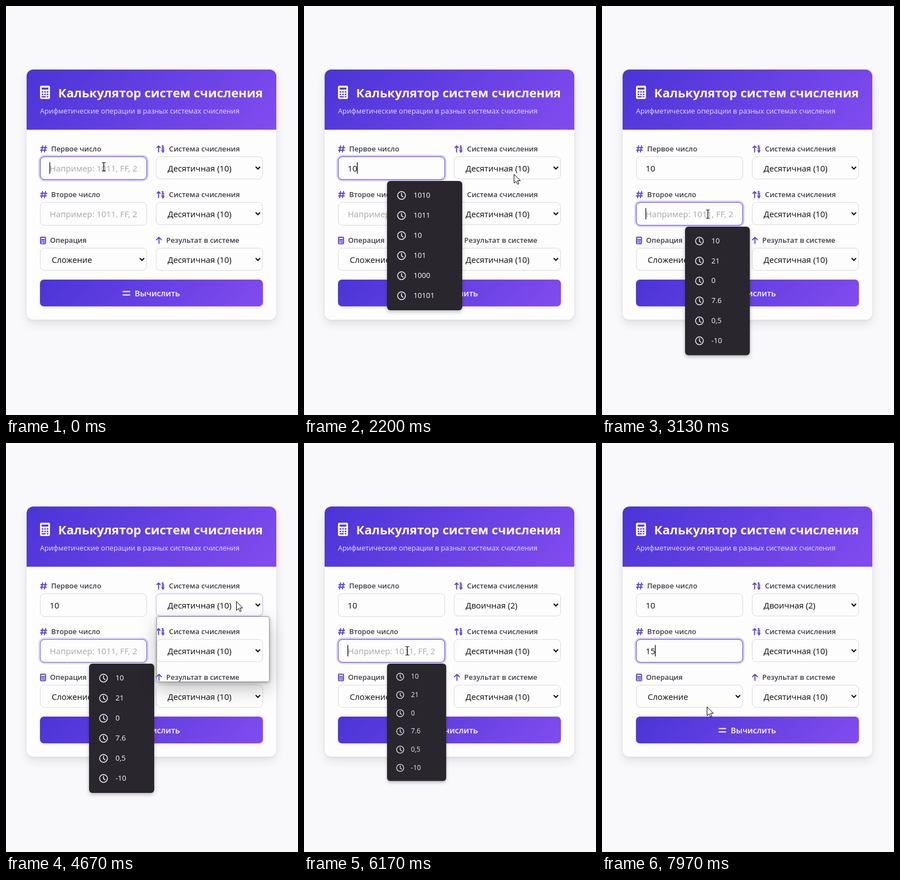
An HTML page for the animation above (8 s loop, 524 by 734 pixels).

```html
<!DOCTYPE html>
<html lang="ru">
<head>
<meta charset="utf-8">
<title>Калькулятор систем счисления</title>
<style>
  html, body { margin: 0; width: 100%; height: 100%; overflow: hidden; background: #f9f9fb; }
  body { position: relative; font-family: "Open Sans", "Noto Sans", sans-serif; }
  svg { position: absolute; left: 0; top: 0; width: 524px; height: 734px; }
  .card { position: absolute; left: 37px; top: 114px; width: 448px; height: 449px; border-radius: 12px;
    background: #fdfdfd; box-shadow: 0 8px 18px rgba(0, 0, 0, .09), 0 2px 5px rgba(0, 0, 0, .06); }
  .header, .button { background: linear-gradient(135deg, #4a34d7, #824cef); }
  .header { height: 108px; border-radius: 12px 12px 0 0; }
  .button { position: absolute; left: 24px; top: 377px; width: 400px; height: 48px; border-radius: 7px;
    box-shadow: 0 2px 4px rgba(0, 0, 0, .12); }
  .title { font-size: 22.15px; font-weight: 700; fill: #fff; }
  .subtitle { font-size: 12.7px; fill: #e4dffb; }
  .label { font-size: 12.85px; font-weight: 600; fill: #3a3d46; }
  .value { font-size: 14.85px; fill: #0a0a0c; }
  .hint { font-size: 15.05px; fill: #a6a6aa; }
  .submit { font-size: 14.3px; font-weight: 600; fill: #fff; }
  .item { font-size: 13.2px; fill: #fff; }
  .icon { color: #5844d8; fill: none; stroke: currentColor; stroke-width: 1.9; stroke-linecap: round; stroke-linejoin: round; }
  .solid { fill: currentColor; stroke: none; }
  .field { fill: #fdfdfd; stroke: #d9dae0; }
  .list { position: absolute; left: 270px; top: 311px; width: 201px; height: 116px; overflow: hidden;
    border: 1px solid #9a9a9e; border-radius: 4px; font-size: 14.85px; line-height: 29px; color: #0a0a0c;
    box-shadow: 0 12px 32px rgba(0, 0, 0, .24), 0 1px 5px rgba(0, 0, 0, .3); }
  .list div { padding-left: 19px; height: 29px; white-space: nowrap; }
  .list.ready { background: #fff; }
  .list:not(.ready) div { visibility: hidden; }
  .list .active { background: #1967d2; color: #fff; }
</style>
</head>
<body>
<div class="card"><div class="header"></div><div class="button"></div></div>

<svg viewBox="0 0 524 734">
  <defs>
    <path id="calc" fill-rule="evenodd" d="M3 0H15a3 3 0 0 1 3 3V21a3 3 0 0 1-3 3H3a3 3 0 0 1-3-3V3a3 3 0 0 1 3-3Z
      M3 3.4V7H15V3.4Z M3 10V12.6H5.8V10Z M7.6 10V12.6H10.4V10Z M12.2 10V12.6H15V10Z
      M3 14.4V17H5.8V14.4Z M7.6 14.4V17H10.4V14.4Z M12.2 14.4V17H15V14.4Z M3 18.8V21H10.4V18.8Z M12.2 18.8V21H15V18.8Z"/>
    <path id="hash" d="M4.7 1 2.7 12M10 1 8 12M1.6 4.2H12M.9 8.8H11.3"/>
    <path id="sort" d="M3.8 12V1.2M1 4 3.8 1.2 6.6 4M10 1.6 11.6.9V5M10 5.2H13.2M13.2 9.2a1.6 1.6 0 1 1-3.2 0a1.6 1.6 0 1 1 3.2 0Q13.2 11.4 11.2 12.4"/>
    <path id="up" d="M5.5 12V1.2M1 5.6 5.5 1.2 10 5.6"/>
    <path id="chevron" d="M-4 -2 0 2 4 -2" fill="none" stroke="#0a0a0c" stroke-width="2"/>
    <g id="clock" fill="none" stroke="#f0f0f2" stroke-width="1.5" stroke-linecap="round">
      <circle r="7"/><path d="M0 -4V.4L2.8 2.6"/>
    </g>
    <filter id="soft" x="-20%" y="-20%" width="140%" height="140%">
      <feDropShadow dx="0" dy="3" stdDeviation="3" flood-color="#000" flood-opacity=".25"/>
    </filter>
  </defs>

  <use href="#calc" x="61" y="143" fill="#fff"/>
  <text class="title" x="93.5" y="164">Калькулятор систем счисления</text>
  <text class="subtitle" x="61" y="193">Арифметические операции в разных системах счисления</text>
  <g id="form"></g>
  <path d="M210 512.5H222M210 518.5H222" stroke="#fff" stroke-width="2" stroke-linecap="round"/>
  <text class="submit" x="231" y="521">Вычислить</text>
  <path id="caret" stroke="#000" stroke-width="1.2"/>
  <g id="history"></g>
</svg>

<div class="list" id="list"></div>

<svg viewBox="0 0 524 734">
  <path id="beam" d="M-3.5 -7.5H-1Q0 -7.5 0 -6.5Q0 -7.5 1 -7.5H3.5M0 -7V7M-3.5 7.5H-1Q0 7.5 0 6.5Q0 7.5 1 7.5H3.5" fill="none" stroke="#000" stroke-width="1.2"/>
  <path id="arrow" d="M.5 .5V16.5L4.2 13 6.8 18.6 9.2 17.5 6.7 12.1H11.8Z" fill="#fff" stroke="#000"/>
</svg>

<script>
const LOOP = 8000;
const $ = id => document.getElementById(id);
const clamp = v => Math.max(0, Math.min(1, v));
const smooth = v => v * v * (3 - 2 * v);
const within = (t, [from, to]) => t >= from && t < to;
const show = (el, on) => { el.style.display = on ? '' : 'none'; };

// ---- form ----
const rows = [270, 352, 434];
const label = (icon, x, textX, y, text) =>
  `<g class="icon" transform="translate(${x} ${y - 20})">${icon}</g>
   <text class="label" x="${textX}" y="${y - 9}">${text}</text>`;
const box = (x, y, h) =>
  `<rect class="field" x="${x + .5}" y="${y + .5}" width="191" height="${h}" rx="7.5"/>`;
const select = (x, y, textX, text, id = '') =>
  `${box(x, y, 40)}<text class="value" id="${id}" x="${textX}" y="${y + 27}">${text}</text>
   <use href="#chevron" x="${x + 183}" y="${y + 20.5}"/>`;
const ring = (id, x, y, h) =>
  `<g id="${id}"><rect x="${x - 1}" y="${y - 1}" width="194" height="${h + 3}" rx="9" fill="none" stroke="#5040e0" stroke-opacity=".24" stroke-width="3.4"/>
   <rect x="${x + .5}" y="${y + .5}" width="191" height="${h}" rx="7.5" fill="none" stroke="#5a48dc"/></g>`;
const input = (n, y) =>
  `${box(61, y, 41)}${ring('ring' + n, 61, y, 41)}
   <text class="hint" id="hint${n}" x="78.5" y="${y + 27}">Например: 1011, FF, 2</text>
   <text class="value" id="input${n}" x="78.5" y="${y + 27}"></text>`;
const use = name => `<use href="#${name}"/>`;

$('form').innerHTML =
  ['Первое число', 'Второе число'].map((name, i) =>
    label(use('hash'), 61, 81, rows[i], name) + input(i, rows[i]) +
    label(use('sort'), 270, 292.5, rows[i], 'Система счисления') +
    select(269, rows[i], 290, 'Десятичная (10)', 'base' + i)).join('') +
  ring('ring2', 269, rows[0], 40) +
  label('<use href="#calc" class="solid" transform="scale(.6 .56)"/>', 61, 79, rows[2], 'Операция') +
  select(61, rows[2], 82, 'Сложение') +
  label(use('up'), 269, 287.5, rows[2], 'Результат в системе') +
  select(269, rows[2], 290, 'Десятичная (10)');

const options = ['Двоичная (2)', 'Восьмеричная (8)', 'Десятичная (10)', 'Шестнадцатеричная (16)'];
$('list').innerHTML = options.map(o => `<div>${o}</div>`).join('');

// ---- timeline ----
const focus = [
  [[-1000, 2330]],
  [[2830, 4645], [5990, 9000]],
  [[2330, 2830], [4645, 5990]]
];
const typing = [
  [[650, '1'], [1100, '10']],
  [[6760, '1'], [6900, '15']]
];
const listOpen = [[2390, 2600], [4655, 5450]];
const chosenAt = 5450;

const recent = ['10', '21', '0', '7.6', '0,5', '-10'];
const popups = [
  { y: 314, w: 127, from: 680, to: 1120, grow: true, items: ['1010', '15', '1011', '1.1', '1G', '10'] },
  { y: 314, w: 135, from: 1120, to: 2390, fade: true, items: ['1010', '1011', '10', '101', '1000', '10101'] },
  { y: 396, w: 117, from: 2970, to: 4700, grow: true, fade: true, items: recent },
  { y: 396, w: 117, from: 6128, to: 6790, grow: true, items: recent },
  { y: 396, w: 117, from: 6790, to: 6930, fade: true, items: ['10'] }
];
$('history').innerHTML = popups.map(p =>
  `<g><rect width="${p.w}" height="${16 + 36 * p.items.length}" rx="6" fill="#29272f" filter="url(#soft)"/><g>` +
  p.items.map((text, i) =>
    `<use href="#clock" x="26" y="${26 + 36 * i}"/><text class="item" x="47.5" y="${30 + 36 * i}">${text}</text>`).join('') +
  '</g></g>').join('');

// Pointer moves: start, end, x, y
const moves = [
  [-1, 0, 175.5, 288.5],
  [1700, 2150, 376.5, 301.5],
  [2600, 2800, 190, 373.5],
  [3900, 4450, 413, 284],
  [4950, 5250, 370, 326],
  [5550, 5900, 185.5, 373],
  [7500, 7960, 188, 473]
];

function pointer(t) {
  let [, , x, y] = moves[0];
  for (const [from, to, nx, ny] of moves) {
    const k = smooth(clamp((t - from) / (to - from)));
    x += (nx - x) * k;
    y += (ny - y) * k;
  }
  return [x, y];
}

function drawFields(t) {
  focus.forEach((spans, i) => {
    $('ring' + i).style.opacity = spans.reduce((sum, [on, off]) =>
      sum + clamp((t - on) / 150) - clamp((t - off) / 150), 0);
  });
  show($('caret'), false);
  typing.forEach((keys, i) => {
    const typed = keys.filter(([at]) => t >= at).pop();
    const text = typed ? typed[1] : '';
    $('input' + i).textContent = text;
    show($('hint' + i), !text);
    const span = focus[i].find(s => within(t, s));
    if (!span) return;
    const since = Math.max(span[0], typed ? typed[0] : 0, 0);
    const x = 78.6 + (text ? $('input' + i).getComputedTextLength() : 0);
    $('caret').setAttribute('d', `M${x} ${rows[i] + 10.5}v20.5`);
    show($('caret'), (t - since) % 1060 < 530);
  });
  $('base0').textContent = options[t < chosenAt ? 2 : 0];
}

function drawPopups(t) {
  popups.forEach((p, i) => {
    const el = $('history').children[i];
    const fadeTime = p.fade ? 80 : 0;
    const on = within(t, [p.from, p.to + fadeTime]);
    show(el, on);
    if (!on) return;
    const k = p.grow ? clamp((t - p.from) / 200) : 1;
    const scale = .85 + .15 * (1 - (1 - k) ** 2);
    el.setAttribute('transform', `translate(149 ${p.y}) scale(${scale})`);
    el.style.opacity = Math.min(1, k * 6) * (t > p.to ? 1 - (t - p.to) / fadeTime : 1);
    el.lastChild.style.opacity = .88 + .12 * k;
  });
}

function drawList(t, y) {
  const span = listOpen.find(s => within(t, s));
  show($('list'), span);
  if (!span) return;
  $('list').classList.toggle('ready', t - span[0] > 40);
  const active = y > 312 && t < chosenAt ? 0 : 2;
  [...$('list').children].forEach((row, i) => row.classList.toggle('active', i === active));
}

function drawPointer(x, y) {
  const overInput = x > 61 && x < 253 && rows.slice(0, 2).some(top => y > top && y < top + 42);
  show($('beam'), overInput);
  show($('arrow'), !overInput);
  $(overInput ? 'beam' : 'arrow').setAttribute('transform', `translate(${x} ${y})`);
}

const start = performance.now();
function frame() {
  const t = (performance.now() - start) % LOOP;
  const [x, y] = pointer(t);
  drawFields(t);
  drawPopups(t);
  drawList(t, y);
  drawPointer(x, y);
  requestAnimationFrame(frame);
}
frame();
</script>
</body>
</html>
```
